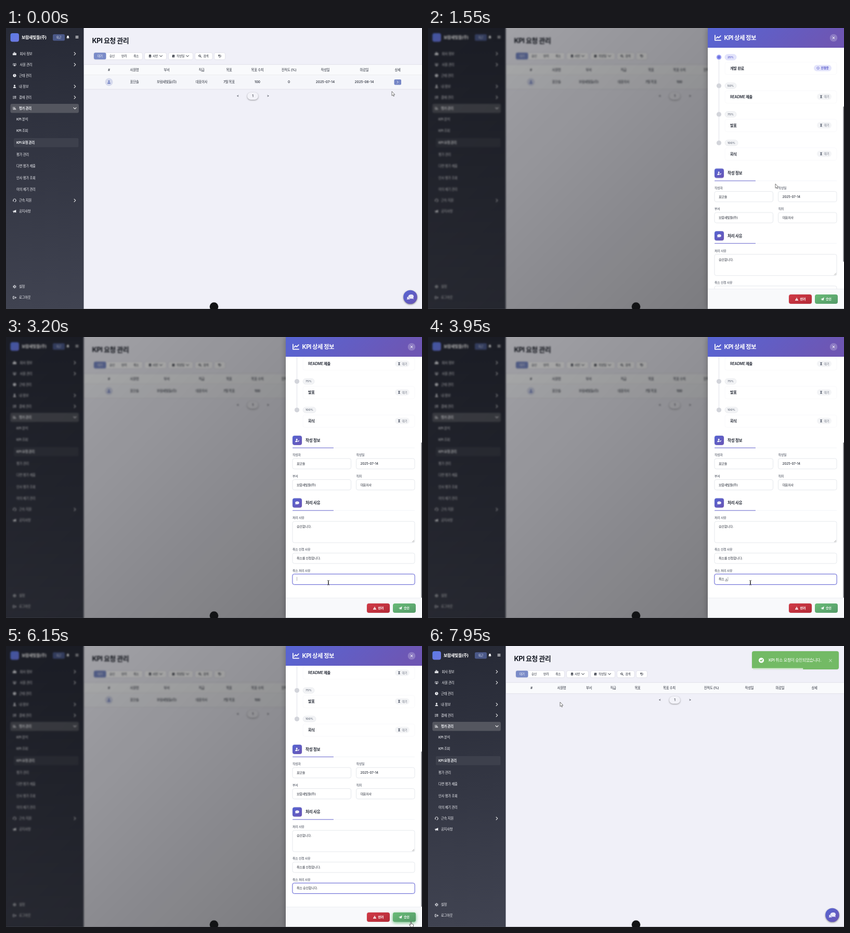
Write an HTML page that moves like this. It is 800x541 px and loops after 8 s.

```html
<!DOCTYPE html>
<html lang="ko">
<head>
<meta charset="utf-8">
<title>KPI 요청 관리</title>
<style>
html, body { margin: 0; width: 100%; height: 100%; overflow: hidden; }
body { position: relative; background: #f0f0f8; }
.layer { position: absolute; left: 0; top: 0; width: 800px; height: 541px; overflow: hidden; }
text { font-family: Inter, "Noto Sans CJK KR", "Noto Sans CJK", sans-serif; white-space: pre; }
.ko { letter-spacing: -.04em; }
.soft { filter: drop-shadow(0 1px 1.5px #2228); }
.lift { filter: drop-shadow(0 .5px 1px #0002); }

.anim { animation: 8s linear infinite; }
.hard { animation: 8s step-end infinite; }
#overlay { background: linear-gradient(135deg, rgba(0,0,0,.3), rgba(0,0,0,.53));
  backdrop-filter: blur(1.6px); animation-name: dim; }
#drawer { animation-name: slide; }
#scroll { animation-name: scroll; }
#thumb { animation-name: thumb; }
#full { animation-name: full; }
#empty { animation-name: empty; }
#ring { animation-name: ring; }
#hint { animation-name: hint; }
#glow { animation-name: glow; }
#toast { animation-name: bounce; }
#progress { animation-name: progress; transform-origin: 623px 0; }
#cursor { animation-name: move; }
#arrow { animation-name: arrow; }
#hand { animation-name: hand; }
#beam { animation-name: beam; }
.typed { visibility: hidden; animation: 8s step-end infinite; }

@keyframes dim { 0%, 3.5% { opacity: 0; animation-timing-function: ease }
  8% { opacity: 1 } 78.75% { opacity: 1; animation-timing-function: ease } 83%, 100% { opacity: 0 } }
@keyframes slide {
  0%, 3.5% { transform: translateX(275px); animation-timing-function: cubic-bezier(.4,0,.2,1) }
  8.5% { transform: none }
  78.75% { transform: none; animation-timing-function: cubic-bezier(.4,0,.2,1) }
  83.25%, 100% { transform: translateX(275px) } }
@keyframes scroll { 0%, 14.5% { transform: none; animation-timing-function: ease-in-out }
  22.5%, 84% { transform: translateY(-256.5px) } 84.01%, 100% { transform: none } }
@keyframes thumb { 0%, 14.5% { transform: none; animation-timing-function: ease-in-out }
  22.5%, 84% { transform: translateY(165px) } 84.01%, 100% { transform: none } }
@keyframes full { 0% { visibility: visible } 81.25%, 100% { visibility: hidden } }
@keyframes empty { 0% { visibility: hidden } 81.25%, 100% { visibility: visible } }
@keyframes ring { 0% { visibility: hidden } 34.375% { visibility: visible } 84%, 100% { visibility: hidden } }
@keyframes hint { 0% { visibility: visible } 41% { visibility: hidden } 84%, 100% { visibility: visible } }
@keyframes glow { 0%, 74% { opacity: 0 } 76%, 81% { opacity: 1 } 83%, 100% { opacity: 0 } }
@keyframes bounce {
  0%, 84% { transform: translateX(1500px); opacity: 0; animation-timing-function: cubic-bezier(.215,.61,.355,1) }
  89.625% { transform: translateX(-12.5px); opacity: 1; animation-timing-function: cubic-bezier(.215,.61,.355,1) }
  91.03% { transform: translateX(5px) } 92.43% { transform: translateX(-2.5px) }
  93.4%, 100% { transform: none; opacity: 1 } }
@keyframes progress { 0%, 84% { transform: none } 100% { transform: scaleX(.573) } }
@keyframes move {
  0%, .6% { transform: translate(742px,122px); animation-timing-function: ease-out }
  2.8%, 10.6% { transform: translate(754px,108px); animation-timing-function: ease-in-out }
  15.5%, 23% { transform: translate(668px,300px); animation-timing-function: ease-in-out }
  29.5%, 69% { transform: translate(620px,473px); animation-timing-function: ease-in-out }
  75.5%, 78.5% { transform: translate(779px,531px); animation-timing-function: ease-in-out }
  82%, 86.9% { transform: translate(779px,525px); animation-timing-function: ease-in-out }
  96.5%, 100% { transform: translate(254px,108px) } }
@keyframes arrow { 0% { visibility: visible } 1.8% { visibility: hidden } 4.5% { visibility: visible }
  27.5% { visibility: hidden } 88%, 100% { visibility: visible } }
@keyframes hand { 0% { visibility: hidden } 1.8% { visibility: visible } 4.5% { visibility: hidden }
  73.5% { visibility: visible } 88%, 100% { visibility: hidden } }
@keyframes beam { 0% { visibility: hidden } 27.5% { visibility: visible } 73.5%, 100% { visibility: hidden } }
@keyframes key { 0% { visibility: visible } 1.3125%, 100% { visibility: hidden } }
@keyframes blink { 0% { visibility: visible } 6.25%, 100% { visibility: hidden } }
@keyframes rest { 0% { visibility: visible } 10.5%, 100% { visibility: hidden } }
</style>
</head>
<body>
<svg class="layer" id="app" viewBox="0 0 800 541"></svg>
<div class="layer anim" id="overlay"></div>
<svg class="layer" id="panel" viewBox="0 0 800 541"></svg>
<svg class="layer" id="top" viewBox="0 0 800 541"></svg>
<script>
const COMPANY = '보람새빛들(주)', PERSON = '표단솔';
const INK = '#262b37', GREY = '#6b7280';

const ring = (x, y, r) => `M${x - r} ${y}a${r} ${r} 0 1 0 ${2 * r} 0a${r} ${r} 0 1 0 ${-2 * r} 0z`;
const person = ring(0, -1.7, 1.6) + 'M-3 3.2q0-2.8 3-2.8t3 2.8z';

const solid = {
  city: 'M-3.8 3V-.8h2v-2.4h2.8V-1.4h2.6V3zM-.9-2.3h1v.8h-1zM-.9-.5h1v.8h-1zM-2.9.4h.7v.8h-.7zM1.8.1h.8v.8h-.8z',
  users: ring(0, -1.2, 1.1) + ring(-2.5, -2, .8) + ring(2.5, -2, .8) +
    'M-2 2.8q0-2.4 2-2.4t2 2.4zM-3.8 1q0-1.8 1.5-1.8L-2.2 1zM3.8 1q0-1.8-1.5-1.8L2.2 1z',
  clock: ring(0, 0, 3.2) + 'M-.4-2h.8v1.9l1.3.9-.4.6-1.7-1.1z',
  user: person,
  list: 'M-.8-2.6h4v.9h-4zM-.8-.4h4v.9h-4zM-.8 1.8h4v.9h-4zM-3.3-2.7h1.6v1.1h-1.6zM-3.3-.5h1.6v1.1h-1.6zM-3.3 1.7h1.6v1.1h-1.6z',
  chart: 'M-3.2-3h.9v5.1h5.5v.9h-6.4zM-1.4-2.2h3v.9h-3zM-1.4-.8h2v.9h-2zM-1.4.6h4v.9h-4z',
  horn: 'M-3.3-1h2L3-3.2v6L-1.3.9h-2zM-2.4 1.2h1.4l.5 2h-1.4z',
  bell: 'M-2.8 2q.8-.8.8-2.4q0-2.4 2-2.8q2 .4 2 2.8q0 1.6.8 2.4zM-.8 2.5h1.6q-.2.8-.8.8t-.8-.8z',
  warn: 'M0-3.2L3.4 2.8h-6.8zM-.4-1.2h.8v2h-.8zM-.4 1.4h.8v.8h-.8z',
  plane: 'M3.4-3.3L2 2.8-.2 1.7-1.4 3.2V1.1L1.8-2-2.2.7-3.5 0z',
  glass: 'M-2.2-3h4.4v1h-.4q-.2 1.2-1.3 2q1.1.8 1.3 2h.4v1h-4.4v-1h.4q.2-1.2 1.3-2q-1.1-.8-1.3-2h-.4z',
  comment: 'M0-2.8q3.6 0 3.6 2.6t-3.6 2.6q-.8 0-1.5-.2l-1.9.8.5-1.6q-.7-.7-.7-1.6q0-2.6 3.6-2.6z' +
    ring(-1.5, -.2, .4) + ring(0, -.2, .4) + ring(1.5, -.2, .4),
  author: ring(-.8, -1.7, 1.5) + 'M-3.6 3q0-2.7 2.8-2.7 1 0 1.6.4L-.2 3zM.8 2.9l.3-1.2 2-2 .9.9-2 2z',
  card: 'M-2.4-3h4.8v6h-4.8z' + ring(0, -.8, .8) + 'M-1.3 1.7q0-1.4 1.3-1.4t1.3 1.4z',
  date: 'M-2.6-2.4h5.2v5.2h-5.2zM-1.6-3.3h.8v.9h-.8zM.8-3.3h.8v.9h-.8zM-1.7-.8h3.4v.6h-3.4zM-.2.8h1.8v1.2h-1.8z',
  check: ring(0, 0, 3.3) + 'M-1.8.1l.7-.7.8.8 1.6-1.7.7.7-2.3 2.4z',
  chats: 'M.8-3.2q3-.2 3.4 2.2q.2 1.2-.6 2l.6 1.6-1.9-.7q-1.4.4-2.5-.2-2.4-.6-2.2-2.6t3.2-2.3zM-2.6-.6q0 2.2 2.6 2.9-1.4.9-2.7.4l-1.7.5.6-1.4q-1-1.4 1.2-2.4z',
};
const line = {
  headset: 'M-2.8.8V-.3a2.8 2.8 0 0 1 5.6 0V.8M-2.4.2v1.6M2.4.2v1.6q0 1-2 1',
  gear: ring(0, 0, 1.8) + 'M0-3.2v1M0 3.2v-1M-3.2 0h1M3.2 0h-1M-2.2-2.2l.7.7M2.2-2.2l-.7.7M-2.2 2.2l.7-.7M2.2 2.2l-.7-.7',
  exit: 'M-.8-2.4h-2.2v4.8h2.2M-1 0h4M1.4-1.7L3.1 0 1.4 1.7',
  bars: 'M-2.6-2h5.2M-2.6 0h5.2M-2.6 2h5.2',
  target: ring(0, 0, 2.9) + ring(0, 0, 1.1),
  trend: 'M-3.2-2.8v5.4h6.4M-1.8.4L-.3-1.2 .9 0 3-2.2',
  close: 'M-2-2l4 4M2-2l-4 4',
  spin: 'M2.4 0a2.4 2.4 0 0 1-4 1.8M-2.4.4a2.4 2.4 0 0 1 1.6-2.6M.4-2.4a2.4 2.4 0 0 1 1.8 1.4',
  search: ring(-.5, -.5, 2) + 'M1 1l2 2',
  undo: 'M-2.4-2.6v2h2M-2.2-.8a2.4 2.4 0 1 1 .4 2.4',
  right: 'M-1.3-2.6L1.3 0-1.3 2.6',
  down: 'M-2.5-1.2L0 1.2 2.5-1.2',
};

const icon = (name, x, y, color = INK, k = 1) =>
  `<path transform="translate(${x} ${y}) scale(${k})" ` + (solid[name]
    ? `d="${solid[name]}" fill="${color}" fill-rule="evenodd"/>`
    : `d="${line[name]}" fill="none" stroke="${color}" stroke-width="1" stroke-linecap="round" stroke-linejoin="round"/>`);
const text = (x, y, s, { size = 6.4, weight = 500, fill = INK, at = 'start', more = '' } = {}) =>
  `<text class="${/[가-힣]/.test(s) ? 'ko' : ''}" x="${x}" y="${y + size * .36}" font-size="${size}" font-weight="${weight}" fill="${fill}" text-anchor="${at}" ${more}>${s}</text>`;
const mid = (x, y, s, o = {}) => text(x, y, s, { at: 'middle', ...o });
const box = (x, y, w, h, r, fill, more = '') =>
  `<rect x="${x}" y="${y}" width="${w}" height="${h}" rx="${r}" fill="${fill}" ${more}/>`;
const dot = (x, y, r, fill, more = '') => `<circle cx="${x}" cy="${y}" r="${r}" fill="${fill}" ${more}/>`;
const grad = (id, a, b, dir = 'x2="1" y2="1"') =>
  `<linearGradient id="${id}" x1="0" y1="0" ${dir}><stop stop-color="${a}"/><stop offset="1" stop-color="${b}"/></linearGradient>`;
const $ = id => document.getElementById(id);

function sidebar() {
  const pale = '#f1f2f6';
  const items = [['city', '회사 정보', 'right'], ['users', '사원 관리', 'right'], ['clock', '근태 관리'],
    ['user', '내 정보', 'right'], ['list', '결재 관리', 'right'], ['chart', '평가 관리', 'down']];
  const rest = [['headset', '근속 지원', 332, 'right'], ['horn', '공지사항', 353], ['gear', '설정', 498], ['exit', '로그아웃', 519]];
  const subs = ['KPI 분석', 'KPI 조회', 'KPI 요청 관리', '평가 관리', '다면 평가 제출', '인사 평가 조회', '이의 제기 관리'];
  const row = (ic, s, y, chev, bold) => icon(ic, 16.5, y, pale, .95) +
    text(ic == 'city' || ic == 'users' ? 26.5 : 25, y, s, { fill: pale, weight: bold ? 700 : 500 }) +
    (chev ? icon(chev, 132.5, y, '#fff', 1.05) : '');
  return box(0, 0, 149.5, 541, 0, 'url(#side)') +
    box(8.5, 10, 16.5, 16.5, 4, 'url(#blue)') +
    text(30, 18, COMPANY, { size: 8, weight: 700, fill: '#fff' }) +
    box(90, 12, 23, 12.5, 2.5, '#4a5888') + mid(101.5, 18, '퇴근', { size: 5.2, fill: '#e6e9f5' }) +
    icon('bell', 119, 17.5, '#fff', .95) + icon('bars', 136.5, 17.5, '#fff', .95) +
    box(8.5, 146, 131.5, 17.5, 3, '#54565f') + box(15, 212, 124.5, 17.5, 2.5, '#3d404c') +
    items.map(([ic, s, chev], i) => row(ic, s, 49.5 + 21 * i, chev, i == 5)).join('') +
    subs.map((s, i) => text(20, 175.5 + 22.6 * i, s, { fill: pale, weight: i == 2 ? 700 : 500 })).join('') +
    rest.map(([ic, s, y, chev]) => row(ic, s, y, chev)).join('');
}

function table(id, xs, cells) {
  const heads = ['#', '사원명', '부서', '직급', '목표', '목표 수치', '진적도 (%)', '작성일', '마감일', '상세'];
  const y = cells ? 131 : 104;
  const row = cells ? box(150, 91, 650, 26.5, 0, '#f5f6fa', 'class="lift"') +
    dot(198, 104, 7.5, '#d6daed') + icon('user', 198, 104, '#7080c4') +
    cells.map((s, i) => mid(xs[i + 1], 104, s)).join('') +
    box(746.5, 99, 13.5, 10.5, 2, '#7586c6') + icon('right', 753.2, 104.2, '#fff', .8) : '';
  return `<g id="${id}" class="hard">` + box(150, 71, 650, 20, 0, '#f9fafc', 'class="lift"') +
    heads.map((s, i) => mid(xs[i], 81, s)).join('') + row +
    mid(446, y, '&lt;') + box(464, y - 7, 21, 14, 7, '#f4f4fa', 'class="soft" opacity=".85"') +
    mid(474.5, y, '1') + mid(504, y, '&gt;') + '</g>';
}

function filters() {
  const button = (x, w, body) => box(x, 48, w, 12.5, 3, '#fff', 'class="lift"') + body;
  const small = { size: 5.7 };
  return button(169, 93, box(169, 47.5, 23.5, 13, 3, '#7a8bc8')) +
    ['대기', '승인', '반려', '취소'].map((s, i) =>
      mid(180.7 + 23.2 * i, 54, s, { size: 5.7, fill: i ? INK : '#fff' })).join('') +
    button(267, 41, icon('card', 277, 54, INK, .85) + text(282, 54, '사번', small) + icon('down', 298, 54)) +
    button(313, 46, icon('date', 322, 54, INK, .85) + text(328, 54, '작성일', small) + icon('down', 349, 54)) +
    button(364, 32.5, icon('search', 373, 54, INK, .9) + text(379.5, 54, '검색', small)) +
    button(401, 20, icon('undo', 411, 54, INK, .9));
}

$('app').innerHTML = '<defs>' + grad('side', '#272a36', '#404351', 'x2="0" y2="1"') +
  grad('blue', '#5b7be6', '#6f78e0') + grad('violet', '#5665d3', '#6b55b4') +
  grad('head', '#5765d4', '#6e56b3', 'x2="1" y2=".15"') + grad('red', '#d13b47', '#b22a37') +
  grad('green', '#69bb77', '#549a69') + '</defs>' +
  box(0, 0, 800, 541, 0, '#f0f0f8') + sidebar() +
  text(165.5, 24, 'KPI 요청 관리', { size: 13, weight: 700, fill: '#161a24' }) + filters() +
  table('full', [198, 247, 309, 376, 429, 483.5, 544, 614, 689, 753],
    [PERSON, COMPANY, '대표이사', '7월 목표', '100', '0', '2025-07-14', '2025-08-14']) +
  table('empty', [199, 257, 309.5, 356, 403, 464, 545, 618, 677, 743]) +
  dot(777.5, 518, 13.3, 'url(#violet)', 'class="soft"') + icon('chats', 777.5, 518, '#e9e8f8', 1.55);

function section(y, ic, title) {
  return box(551, y - 9, 18, 18, 4, 'url(#violet)', 'class="lift"') + icon(ic, 560, y, '#fff', 1.05) +
    text(576, y, title, { size: 7.6, weight: 700 }) +
    box(551, y + 14.2, 235, .6, 0, '#eceef3') + box(551, y + 13.9, 79, 1.1, .5, '#6463cc');
}
const field = (x, y, w, label, value, h = 20) => text(x, y, label, { size: 6, fill: '#3a4150' }) +
  box(x, y + 7, w, h, 3.5, '#fff', 'stroke="#dfe2e8" stroke-width=".8"') +
  text(x + 8, y + 17, value, { size: 6.1 });
const pair = (y, a, av, b, bv) => field(551, y, 112.5, a, av) + field(673.5, y, 112.5, b, bv);

function step(title, i) {
  const y = 232 + 55 * i, on = i == 0;
  const color = on ? '#5a5ccc' : GREY, bg = on ? '#e3e4fb' : '#f3f4f6';
  const x = on ? 742 : 748, w = i == 3 ? 25 : 22;
  return dot(559.5, y, 4.6, on ? '#8b90ee' : '#d2d4da', on ? 'stroke="#c9ccf8" stroke-width="1"' : '') +
    (on ? dot(559.5, y, 2.3, '#6a6de0') : '') +
    box(571, y - 5.5, w, 11, 5.5, bg, `stroke="${on ? '#cfd2f8' : '#e2e4e9'}" stroke-width=".6"`) +
    mid(571 + w / 2, y, `${25 * (i + 1)}%`, { size: 5.4, weight: 600, fill: color }) +
    box(571, y + 9.5, 215, 24, 4, '#fff', 'stroke="#f6f7f9" stroke-width=".7"') +
    text(581, y + 21, title, { size: 7.2, weight: 600 }) +
    box(x, y + 15, 776 - x, 12, 6, bg) + icon(on ? 'spin' : 'glass', x + 8, y + 21, color, .9) +
    text(x + 13.5, y + 21, on ? '진행중' : '대기', { size: 5.7, weight: on ? 700 : 500, fill: color });
}

// Hangul composition, one keystroke per entry
const strokes = ['ㅊ', '추', '취', '췻', '취소', '취소 ', '취소 ㅅ', '취소 스', '취소 승', '취소 승ㅇ', '취소 승이',
  '취소 승인', '취소 승읺', '취소 승인하', '취소 승인합', '취소 승인합ㄴ', '취소 승인합니', '취소 승인합닏',
  '취소 승인합니다', '취소 승인합니다.'];
function typing() {
  const start = 3280, gap = 105, end = start + gap * strokes.length, done = strokes.at(-1);
  const caret = '<tspan dx="-.5" font-weight="300">|</tspan>';
  const compose = s => /[ .]$/.test(s) ? s : `${s.slice(0, -1)}<tspan text-decoration="underline">${s.at(-1)}</tspan>`;
  const show = (s, name, delay) => text(559, 722.5, s,
    { size: 6.1, more: `style="animation-name:${name};animation-delay:${delay}ms"` }).replace('class="', 'class="typed ');
  return show(caret, 'blink', 2750) +
    strokes.map((s, i) => show(compose(s) + caret, 'key', start + gap * i)).join('') +
    show(done + caret, 'blink', end) + show(done, 'rest', end + 500);
}

const content = section(61.5, 'target', 'KPI 정보') +
  pair(89.5, '목표', '7월 목표', '목표 수치', '100') + pair(130, '진척도'.replace('척', '적'), '0', '마감일', '2025-08-14') +
  section(182, 'chart', '진적 기준') + text(551, 210, '진적도 타임라인', { size: 6, fill: '#3a4150' }) +
  box(559, 232, 1, 165, 0, '#dfe1ea') +
  ['개발 완료', 'README 제출', '발표', '회식'].map(step).join('') +
  section(455.5, 'author', '작성 정보') +
  pair(483.5, '작성자', PERSON, '작성일', '2025-07-14') + pair(524, '부서', COMPANY, '직위', '대표이사') +
  section(576, 'comment', '처리 사유') + field(551, 604.5, 235, '처리 사유', '승인합니다.', 41) +
  '<path d="M781 651.5l4-4M783.2 651.5l1.8-1.8" stroke="#777" stroke-width=".6"/>' +
  field(551, 665.5, 235, '취소 신청 사유', '취소를 신청합니다.') + field(551, 706, 235, '취소 처리 사유', '') +
  '<g id="hint" class="hard">' + text(559, 723, '취소 처리 사유',
    { size: 5.9, weight: 400, fill: '#9ca3af', more: 'font-style="italic"' }) + '</g>' +
  '<g id="ring" class="hard">' + box(551, 713, 235, 20, 3.5, 'none', 'stroke="#dcdcf8" stroke-width="2.6"') +
  box(551, 713, 235, 20, 3.5, '#fff', 'stroke="#6f71d6" stroke-width="1"') + '</g>' + typing();

$('panel').innerHTML = '<g id="drawer" class="anim">' +
  box(538, 0, 262, 541, 0, '#fff', 'style="filter:drop-shadow(-2px 0 5px #0003)"') +
  `<svg x="538" y="38" width="262" height="464" viewBox="538 38 262 464"><g id="scroll" class="anim">${content}</g></svg>` +
  box(798.4, 38, 1.6, 299, .8, '#77787f', 'id="thumb" class="anim"') +
  box(538, 0, 262, 38, 0, 'url(#head)') + icon('trend', 557.5, 19, '#fff', 1.75) +
  text(569.5, 19, 'KPI 상세 정보', { size: 11.3, weight: 700, fill: '#fff' }) +
  dot(780, 19, 7.3, '#ffffff38') + icon('close', 780, 19, '#fff', .95) +
  box(538, 502, 262, 39, 0, '#f8f9fb') + box(538, 502, 262, .6, 0, '#e5e7eb') +
  box(694, 513, 44, 18, 4, 'url(#red)', 'class="lift"') + icon('warn', 709, 522, '#fff', .95) +
  text(715.5, 522, '반려', { size: 6.1, weight: 600, fill: '#fff' }) +
  '<g id="glow" class="anim">' + box(744, 513, 44, 18, 4, '#69bb77', 'style="filter:drop-shadow(0 2px 3px #4caf64cc)"') + '</g>' +
  box(744, 513, 44, 18, 4, 'url(#green)') + icon('plane', 758.5, 522, '#fff', .95) +
  text(765, 522, '승인', { size: 6.1, weight: 600, fill: '#fff' }) + '</g>';

$('top').innerHTML = box(0, 540.4, 800, .6, 0, '#55586088') +
  dot(400, 536.5, 8.3, '#121315', 'class="lift"') +
  '<g id="toast" class="anim">' + box(623, 10, 167, 35, 4, '#73ba65', 'class="lift"') +
  icon('check', 641, 27.5, '#fff', 1.55) +
  text(655, 27.5, 'KPI 취소 요청이 승인되었습니다.', { size: 7.8, weight: 500, fill: '#fff' }) +
  icon('close', 774, 28, '#b5dcae', 1.15) +
  box(623, 42.6, 167, 2.4, 0, '#ffffffb3', 'id="progress" class="anim"') + '</g>' +
  '<g id="cursor" class="anim" stroke-linejoin="round">' +
  '<path id="arrow" class="hard" d="M0 0v8.4l1.9-1.7 1.3 2.9 1.3-.6-1.3-2.8h2.6z" fill="#fff" stroke="#555" stroke-width=".8"/>' +
  '<path id="hand" class="hard" d="M-1 .6q0-.9.8-.9t.8.9v3.4l3 .7q1.2.3 1.1 1.5l-.5 2.6q-.2 1.2-1.4 1.2h-2.6q-.8 0-1.3-.8l-2.2-3.4q-.2-1 .9-.8l1.4 1z" fill="#fff" stroke="#333" stroke-width=".8"/>' +
  '<path id="beam" class="hard" d="M-2-4.3q2 0 2 1v6.6q0 1-2 1M2-4.3q-2 0-2 1v6.6q0 1 2 1M-1 .8h2" fill="none" stroke="#222" stroke-width=".9"/></g>';
</script>
</body>
</html>
```
